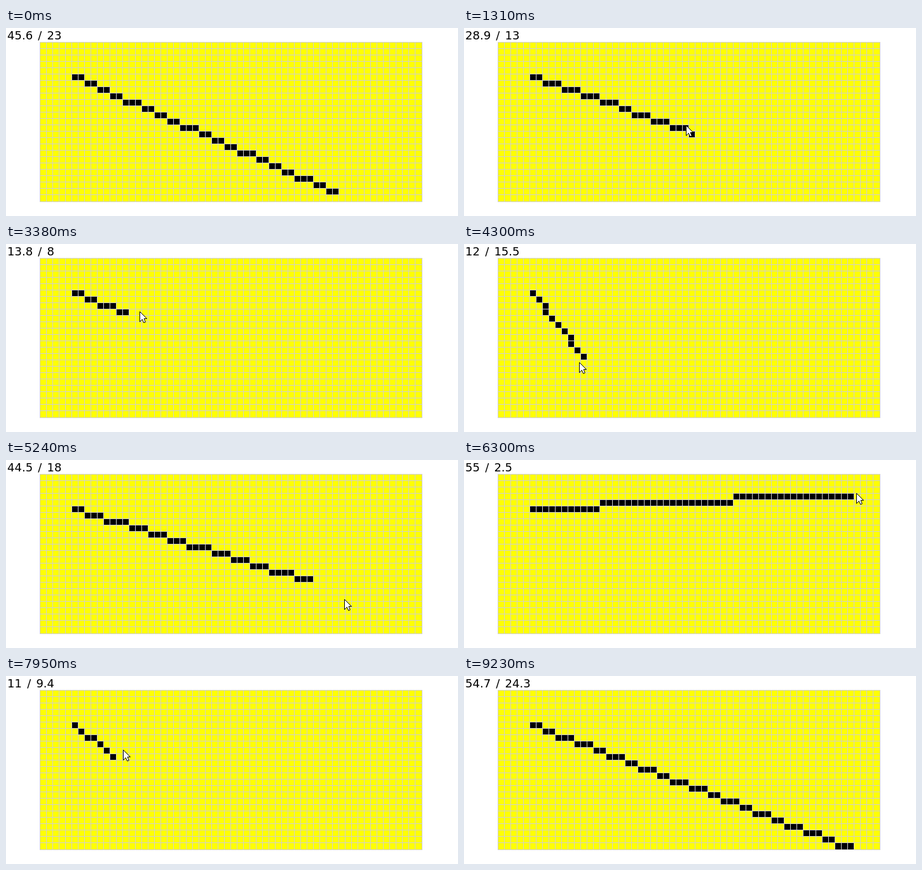
Write an HTML page with a canvas that moves like this. It is 711x296 px and loops after 9.8 s.

```html
<!DOCTYPE html>
<html lang="en">
<head>
<meta charset="utf-8">
<title>Line on a grid</title>
<style>
  html, body { margin: 0; width: 100%; height: 100%; overflow: hidden; background: #fff; }
  canvas { position: absolute; left: 0; top: 0; display: block; }
  #pos {
    position: absolute; left: 2px; top: 0;
    font: 18px/24px "DejaVu Sans", sans-serif;
    word-spacing: 2.5px; white-space: pre; color: #000;
  }
</style>
</head>
<body>
<canvas id="stage" width="711" height="296"></canvas>
<div id="pos"></div>
<script>
const LOOP = 9800, TICK = 10;
const COLS = 60, ROWS = 25, CELL = 10, LEFT = 53, TOP = 22;
const WIDTH = COLS * CELL + 2, HEIGHT = ROWS * CELL + 2;
const START = { x: 5, y: 5 };

// The readout and the line trail the pointer
const TEXT_LAG = 20, LINE_LAG = 50;
const SHOW = 690, HIDE = 9200;

// Pointer stops: arrival in ms, column, row, optional rest in ms
const stops = [
  [680, 45.6, 23], [720, 50.5, 25],
  [1600, 17.2, 6.5, 130], [2070, 10.4, 7.2, 150], [2380, 3.7, 10.9, 50],
  [2800, 8, 16], [3210, 10.6, 9], [3600, 19, 6.5],
  [4250, 12.8, 14.9], [4300, 11.4, 15.9], [4500, 10, 17],
  [5190, 41.6, 16.25], [5240, 46.5, 19.2], [5450, 55, 20.6],
  [6250, 55, 2.6], [6300, 55, 2.5], [7190, 41.4, 20.6],
  [7900, 10.6, 9.6], [7930, 11, 9.4], [7950, 11.7, 8.9],
  [8590, 12, 10.4, 500], [9180, 54.7, 24.3]
];

const ctx = document.getElementById("stage").getContext("2d");
const label = document.getElementById("pos");
const arrow = new Path2D("M.5 .5V16.5L4.3 12.6L6.8 18L9.3 17L7.2 11.5H11.5Z");

function pointAt(t) {
  const next = stops.findIndex(s => s[0] > t);
  const [, x1, y1] = stops[next < 0 ? stops.length - 1 : next];
  if (next <= 0) return { x: x1, y: y1 };
  const [arrive, x0, y0, rest = 0] = stops[next - 1];
  const leave = arrive + rest;
  const u = Math.max(0, (t - leave) / (stops[next][0] - leave));
  return { x: x0 + (x1 - x0) * u, y: y0 + (y1 - y0) * u };
}

function drawGrid() {
  ctx.fillStyle = "#ff0";
  ctx.fillRect(LEFT, TOP, WIDTH, HEIGHT);
  ctx.fillStyle = "#d0d0d0";
  for (let c = 0; c < COLS; c++) ctx.fillRect(LEFT + c * CELL, TOP, 1, HEIGHT);
  for (let r = 0; r < ROWS; r++) ctx.fillRect(LEFT, TOP + r * CELL, WIDTH, 1);
  ctx.fillRect(LEFT + WIDTH - 1, TOP, 1, HEIGHT);
  ctx.fillRect(LEFT, TOP + HEIGHT - 1, WIDTH, 1);
}

// The last row and column are one pixel larger
function fillCell(c, r) {
  if (c < 0 || r < 0 || c >= COLS || r >= ROWS) return;
  const size = (i, count) => i === count - 1 ? CELL : CELL - 1;
  ctx.fillRect(LEFT + 1 + c * CELL, TOP + 1 + r * CELL, size(c, COLS), size(r, ROWS));
}

function drawLine(end) {
  const dx = end.x - START.x, dy = end.y - START.y;
  const span = Math.max(Math.abs(dx), Math.abs(dy)) || 1;
  ctx.fillStyle = "#000";
  for (let k = 0; k <= Math.round(span); k++) {
    fillCell(Math.round(START.x + dx * k / span), Math.round(START.y + dy * k / span));
  }
}

function drawArrow(p) {
  ctx.save();
  ctx.translate(Math.round(p.x * CELL + 67), Math.round(p.y * CELL + 27));
  ctx.fillStyle = "#fff";
  ctx.fill(arrow);
  ctx.strokeStyle = "#000";
  ctx.stroke(arrow);
  ctx.restore();
}

const short = v => String(Math.round(v * 10) / 10);

function render(t) {
  ctx.clearRect(0, 0, 711, 296);
  drawGrid();
  drawLine(pointAt(t - LINE_LAG));
  if (t >= SHOW && t < HIDE) drawArrow(pointAt(t));
  const p = pointAt(t - TEXT_LAG);
  label.textContent = short(p.x) + " / " + short(p.y);
}

const begin = performance.now();
function tick() {
  const t = (performance.now() - begin) % LOOP;
  render(Math.floor(t / TICK) * TICK);
  requestAnimationFrame(tick);
}
tick();
</script>
</body>
</html>
```
